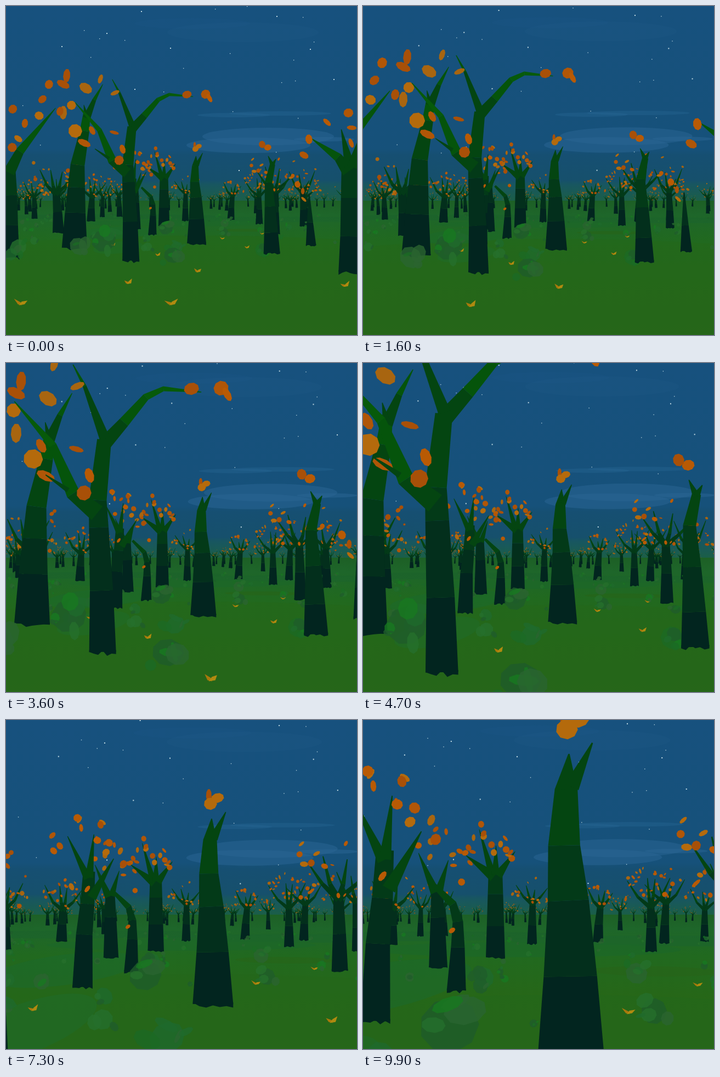
These frames come from a looping animation (640x600 px, 10 s). An HTML page with a canvas:

```html
<!DOCTYPE html>
<html>
<head>
<meta charset="utf-8">
<style>
html, body { margin: 0; width: 640px; height: 600px; overflow: hidden; background: #17517c; }
canvas { display: block; }
</style>
</head>
<body>
<canvas id="stage" width="640" height="600"></canvas>
<script>
const g = document.getElementById('stage').getContext('2d');
const HORIZON = 357, GROUND = 106.5, TAU = Math.PI * 2;
const BARK = ['#02251f', '#032f1c', '#033a18', '#044511', '#05540b', '#075a0a'];
const LEAF = ['#b05607', '#a86510', '#b85a04', '#a85008', '#b46a0c'];
const GREEN = ['#1c6a24', '#256f2c', '#1f5c2a', '#187820', '#2a6430', '#1f6a2c'];

let seed = 7;
function rnd(a = 0, b = 1) {
  seed = (seed + 0x6D2B79F5) | 0;
  let n = Math.imul(seed ^ seed >>> 15, 1 | seed);
  n = n + Math.imul(n ^ n >>> 7, 61 | n) ^ n;
  return a + (b - a) * ((n ^ n >>> 14) >>> 0) / 4294967296;
}
const pick = list => list[Math.floor(rnd(0, list.length))];

function pairs(list) {
  const out = [];
  for (let i = 0; i < list.length; i += 2) out.push([list[i], list[i + 1]]);
  return out;
}

// World units are pixels at depth 10; depth is in seconds of walking.
const items = [];

// A tapering limb along a spine, one shade per segment.
function limb(spine, w0, w1, shade) {
  const len = [0];
  for (let i = 1; i < spine.length; i++) {
    len.push(len[i - 1] + Math.hypot(spine[i][0] - spine[i - 1][0], spine[i][1] - spine[i - 1][1]));
  }
  const last = spine.length - 1;
  const edge = spine.map(([x, y], i) => {
    const a = spine[Math.max(i - 1, 0)], b = spine[Math.min(i + 1, last)];
    const dx = b[0] - a[0], dy = b[1] - a[1];
    const k = (w0 + (w1 - w0) * len[i] / len[last]) / 2 / Math.hypot(dx, dy);
    return [[x + dy * k, y - dx * k], [x - dy * k, y + dx * k]];
  });
  return edge.slice(1).map((e, i) => ({
    color: BARK[Math.min(shade + i, 5)],
    points: [edge[i][0], edge[i][1], e[1], e[0]]
  }));
}

function jaggedFoot(w) {
  const points = [[-w / 2, GROUND - 4]];
  for (let i = 0; i <= 6; i++) points.push([w * (i / 6 - .5), GROUND + rnd(-4, 3)]);
  points.push([w / 2, GROUND - 4]);
  return { color: BARK[0], points };
}

function oval(x, y, rx, ry, turn, color) {
  const points = [], c = Math.cos(turn), s = Math.sin(turn);
  for (let i = 0; i < 9; i++) {
    const u = Math.cos(i / 9 * TAU) * rx, v = Math.sin(i / 9 * TAU) * ry;
    points.push([x + u * c - v * s, y + u * s + v * c]);
  }
  return { color, points };
}
const leaf = (x, y, r) => oval(x, y, r, r * rnd(.35, 1), rnd(0, 3), pick(LEAF));

// Pixels as seen from depth `near`. Trunk: widths, then points; branch: width, then points.
function tree(x, z, near, [w0, w1, ...trunk], branches, [size, ...leaves], perTip = 0) {
  const k = near / 10, foot = trunk[0];
  const place = ([px, py]) => [(px - foot) * k, (py - HORIZON) * k];
  const spine = pairs(trunk).map(place);
  spine[0][1] = GROUND - 2;
  const parts = [jaggedFoot(w0 * k), ...limb(spine, w0 * k, w1 * k, 0)];
  branches.forEach(([w, ...list]) => {
    const arm = pairs(list).map(place), [tx, ty] = arm[arm.length - 1];
    parts.push(...limb(arm, w * k, 1, 3));
    for (let i = 0; i < perTip; i++) {
      parts.push(leaf(tx + rnd(-26, 26), ty + rnd(-26, 22), size * k));
    }
  });
  pairs(leaves).forEach(p => parts.push(leaf(...place(p), size * k)));
  items.push({ x, z, parts });
}

function wildTree(x, z, leaves = 16) {
  const w = rnd(30, 46), fork = rnd(-60, -20), crown = rnd(80, 115), lean = rnd(-10, 10);
  const parts = [jaggedFoot(w), ...limb([[0, GROUND - 2], [lean * .3, 35], [lean, fork]], w, w * .6, 0)];
  for (let i = 0; i < 4; i++) {
    const side = (i - 1.5) * crown * .42 + rnd(-12, 12);
    parts.push(...limb([[lean, fork + 8], [lean + side * .55, fork - crown * .25],
      [lean + side, fork - crown * rnd(.5, .95)]], w * .4, 2, 2));
  }
  for (let i = 0; i < leaves; i++) {
    parts.push(leaf(lean + rnd(-.85, .85) * crown, fork + 10 - crown * rnd(.1, 1.25), rnd(4, 8.5)));
  }
  items.push({ x, z, parts });
}

function bush(x, z, y, r, count = 5) {
  const parts = [oval(0, y, r, r * rnd(.8, 1.05), rnd(0, 3), pick(GREEN))];
  for (let i = 1; i < count; i++) {
    const q = r * rnd(.35, .8);
    parts.push(oval(rnd(-1.1, 1.1) * r, y + rnd(-1, .9) * r, q, q * rnd(.25, 1), rnd(0, 3), pick(GREEN)));
  }
  items.push({ x, z, parts, alpha: .8 });
}

function fallenLeaf(x, z) {
  const a = rnd(5, 8), tilt = rnd(-2, 2), y = GROUND;
  items.push({ x, z, parts: [
    { color: '#a8780c', points: [[-a, y - 3 + tilt], [0, y], [1, y + 3], [-3, y + 2]] },
    { color: '#b08a10', points: [[a, y - 3 - tilt], [1, y - 1], [-2, y + 3], [4, y + 2]] }] });
}

// Nearby trees
tree(-242, 12.4, 8.8, [65, 18, 44, 477, 46, 385, 49, 320, 52, 262, 70, 175, 76, 128],
  [[20, 75, 142, 95, 95, 117, 55], [11, 74, 135, 68, 108]],
  [18, 24, 33, 15, 55, 73, 65, 15, 128, 46, 175, 69, 206]);
tree(-90, 9.75, 6.15, [49, 26, 176, 530, 174, 415, 169, 300, 167, 250, 179, 140],
  [[26, 177, 150, 215, 108, 255, 62, 287, 47, 356, 53], [19, 180, 138, 143, 42, 122, 3],
   [32, 166, 274, 122, 238, 85, 150, 15, 70], [9, 113, 232, 72, 204]],
  [14, 338, 47, 392, 46, 403, 57, 128, 157, 152, 205, 142, 237, 64, 151, 130, 42, 88, 2]);
tree(38, 13.8, 4.9, [98, 33, 382, 575, 381, 445, 378, 335, 372, 255, 375, 173],
  [[33, 375, 174, 379, 122], [22, 383, 170, 413, 106]],
  [16, 372, 66, 376, 86, 393, 72]);
tree(184.5, 11.2, 7.6, [44, 14, 565, 492, 563, 440, 560, 370, 556, 305, 567, 256],
  [[12, 567, 260, 555, 234], [11, 567, 258, 576, 242]],
  [10, 554, 211, 539, 203]);
tree(-321, 10.3, 10.3, [32, 24, 8, 460, 7, 400, 7, 345, 5, 300],
  [[22, 5, 304, 25, 265, 90, 186]],
  [8.5, 78, 143, 98, 192, 119, 181, 66, 170, 60, 200, 34, 214, 22, 242, 12, 188, 11, 258]);
tree(252, 8.2, 8.2, [42, 35, 628, 486, 630, 420, 630, 350, 630, 290],
  [[24, 625, 302, 606, 276, 558, 242], [20, 628, 294, 612, 225], [20, 632, 294, 656, 215]],
  [9, 553, 243, 586, 212, 544, 272, 631, 222, 625, 195, 630, 250]);
tree(314, 13.3, 11.7, [21, 2, 590, 447, 588, 400, 586, 340], [],
  [7, 562, 321, 573, 335, 575, 352]);
tree(-93.5, 17.6, 10.3, [26, 6, 228, 460, 230, 400, 230, 365, 223, 341, 194, 312], [],
  [5, 222, 377, 235, 311]);
tree(-76, 23.8, 14.7, [33, 24, 257, 431, 257, 375, 257, 320, 257, 282],
  [[18, 254, 290, 205, 252], [14, 252, 288, 229, 208], [14, 257, 286, 258, 236], [16, 261, 288, 291, 246]],
  [6, 154, 208, 172, 212], 4);
tree(-144.5, 15.35, 6.45, [46, 27, 77, 522, 81, 400, 88, 330, 92, 256],
  [[18, 89, 272, 43, 176], [19, 92, 270, 103, 172], [22, 98, 316, 148, 227]],
  [9, 74, 157, 118, 150, 88, 296, 52, 291], 4);
tree(-175, 21, 12.1, [31, 19, 164, 443, 163, 360, 162, 308],
  [[16, 159, 318, 131, 252], [14, 165, 316, 181, 264]], [6], 3);

// Middle distance: x, depth
pairs([-420, 18.7, -911, 34, -550, 24.5, -1300, 46, -495, 30, -440, 39, 288, 32, 370, 26.1, 530, 31,
  678, 50, 528, 23.7, 304, 17.8, 21, 30.4, 733, 32.5, -556, 38.5]).forEach(p => wildTree(...p));

// Tree line
for (let i = 0; i < 58; i++) {
  const z = rnd(50, 130);
  wildTree(rnd(-36, 36) * z, z, 9);
}

// Undergrowth: x, depth, height, radius
[[-13, 8.4, 82, 14], [176, 12, 105, 15], [-152, 8.1, 66, 14], [-160, 11.3, 80, 25], [-11, 11.7, 98, 15],
 [-37, 13, 62, 17], [-50, 17, 80, 14], [124, 15.8, 62, 12], [113, 14.5, 80, 11], [-280, 9.4, 78, 15]
].forEach(a => bush(...a));
for (let i = 0; i < 105; i++) {
  const z = rnd(11, 38);
  bush(rnd(-36, 36) * z, z, rnd(78, 106), rnd(3, 11), 3);
}

pairs([-71, 7.3, -11, 5.8, -170, 5.8, 210, 7.05, 25, 8.5, -170, 13.6, 154, 12.9, 270, 18.4, -48, 11.1, 119, 16])
  .forEach(p => fallenLeaf(...p));
items.sort((a, b) => b.z - a.z);

// Ground patches: x, depth, half width, half depth, colour
const patches = [
  [-600, 40, 900, 7, '#1c632b'], [700, 34, 800, 5, '#1c642b'], [0, 28, 500, 4, '#1d6828'],
  [250, 20.5, 120, 1, '#276519'], [50, 9.3, 620, 8, '#24671b'],
  [-230, 19.4, 133, 4, '#1d692a'], [-148, 13, 54, 1.8, '#1f6a27']
];

const stars = pairs([246, 9, 381, 5, 439, 0, 493, 18, 541, 20, 561, 65, 554, 78, 524, 98, 527, 136, 597, 133,
  502, 139, 408, 86, 299, 76, 323, 113, 287, 156, 234, 151, 154, 93, 170, 59, 183, 49, 142, 44, 216, 62,
  101, 73, 413, 192, 532, 204, 424, 299, 30, 181, 142, 268, 187, 257, 62, 253, 492, 266]);
const clouds = [[340, 32, 105, 10, .05], [432, 48, 138, 18, .1], [415, 199, 66, 4, .35], [500, 196, 93, 4, .35],
  [478, 238, 120, 16, .5], [442, 254, 113, 14, .5], [580, 243, 55, 4, .5]];

function fillPoints(points, color) {
  g.fillStyle = color;
  g.beginPath();
  points.forEach(([x, y]) => g.lineTo(x, y));
  g.fill();
}

function gradient(top, bottom, stops) {
  const fill = g.createLinearGradient(0, top, 0, bottom);
  stops.forEach(([at, color]) => fill.addColorStop(at, color));
  return fill;
}
const sky = gradient(0, HORIZON, [[0, '#17517e'], [.73, '#16517a'], [.76, '#164f72'], [.89, '#16506c'],
  [.91, '#185661'], [1, '#1b5f46']]);
const soil = gradient(HORIZON, 600, [[0, '#1d6026'], [.1, '#1e662a'], [.3, '#21691f'], [.6, '#266718'], [1, '#2a6517']]);

function draw(t) {
  // The walk bends to the right towards the end.
  const cx = 320 + 2.5 * Math.sin(Math.PI * Math.min(t / 7.3, 1)) ** 2 - 1.9 * Math.max(0, t - 6.8) ** 2;
  const drift = .67 * Math.max(0, t - 6.5) ** 2;
  g.setTransform(1, 0, 0, 1, 0, 0);
  g.fillStyle = sky;
  g.fillRect(0, 0, 640, HORIZON);

  const far = 285 / (285 - t);
  g.setTransform(far, 0, 0, far, cx - 320 * far, HORIZON * (1 - far));
  clouds.forEach(([x, y, rx, ry, a]) => {
    g.fillStyle = `rgba(42,103,148,${a})`;
    g.beginPath();
    g.ellipse(x, y, rx, ry, 0, 0, TAU);
    g.fill();
  });
  g.fillStyle = '#bcd6e0';
  stars.forEach(([x, y], i) => {
    const size = i % 3 ? 1.3 : 2;
    g.fillRect(x, y, size, size);
  });

  g.setTransform(1, 0, 0, 1, 0, 0);
  g.fillStyle = soil;
  g.fillRect(0, HORIZON - 2, 640, 245);
  g.globalAlpha = .65;
  patches.forEach(([x, z, rx, rz, color]) => {
    const points = [];
    for (let i = 0; i < 48; i++) {
      const a = i / 48 * TAU, s = 10 / Math.max(z - t + rz * Math.sin(a), .4);
      points.push([cx + (x - drift + rx * Math.cos(a)) * s, HORIZON + GROUND * s]);
    }
    fillPoints(points, color);
  });

  items.forEach(({ x, z, parts, alpha = 1 }) => {
    if (z - t < .9) return;
    const s = 10 / (z - t), px = cx + (x - drift) * s;
    if (px < -300 * s || px > 640 + 300 * s) return;
    g.setTransform(s, 0, 0, s, px, HORIZON);
    g.globalAlpha = alpha;
    parts.forEach(p => fillPoints(p.points, p.color));
  });
  g.globalAlpha = 1;
}

const start = performance.now();
function tick() {
  const ms = (performance.now() - start) % 10000;
  draw(Math.floor(ms / 100) / 10);
  requestAnimationFrame(tick);
}
tick();
</script>
</body>
</html>
```
